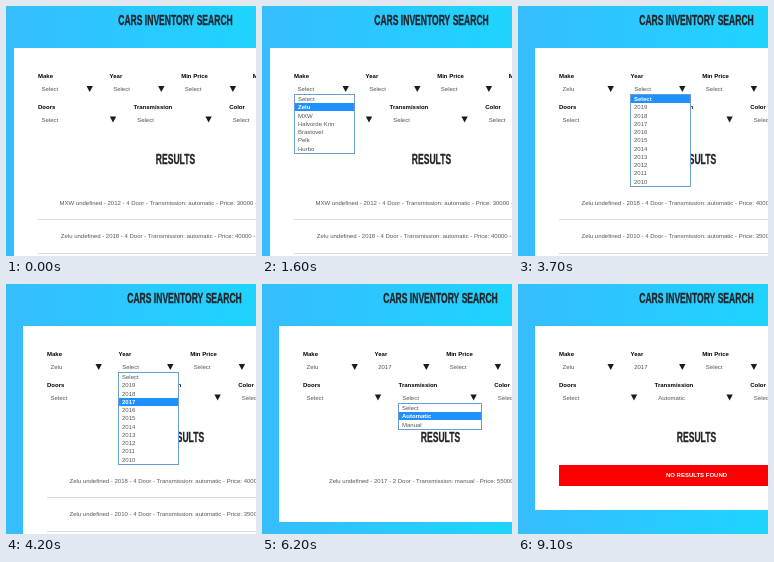
Recreate the animation shown at these times as an HTML page with a canvas. Size 250x250 px, loop 9.2 s.

```html
<!DOCTYPE html>
<html lang="en">
<head>
<meta charset="utf-8">
<title>Cars inventory search</title>
<style>
html, body { margin: 0; width: 100%; height: 100%; overflow: hidden; }
canvas { display: block; width: 100vw; height: 100vh; }
</style>
</head>
<body>
<canvas id="stage"></canvas>
<script>
const SIZE = 250, LOOP = 9200, ITEM = 8.25;
const SANS = '"Liberation Sans", Arial, sans-serif';
const INK = '#555', DARK = '#212529';
const canvas = document.getElementById('stage');
const ctx = canvas.getContext('2d');

const makes = ['Select', 'Zelu', 'MXW', 'Halvorde Krin', 'Brastovel', 'Pelk', 'Hurbo'];
const years = ['Select', ...Array.from({ length: 10 }, (_, i) => String(2019 - i))];
const gears = ['Select', 'Automatic', 'Manual'];

const car = (make, year, doors, gear, price) =>
  `${make} undefined - ${year} - ${doors} Door - Transmission: ${gear} - Price: ${price} -`;

const allCars = [[53.5, car('MXW', 2012, 4, 'automatic', 30000)],
                 [54.8, car('Zelu', 2018, 4, 'automatic', 40000)]];
const byMake = [[54.5, car('Zelu', 2018, 4, 'automatic', 40000)],
                [54.5, car('Zelu', 2010, 4, 'automatic', 35000)]];
const byYear = [[58, car('Zelu', 2017, 2, 'manual', 55000)]];

// Value of the last step that has begun
function stepAt(t, steps) {
  let value = steps[0][1];
  for (const [start, v] of steps) if (t >= start) value = v;
  return value;
}

function rect(x, y, w, h, fill) {
  ctx.fillStyle = fill;
  ctx.fillRect(x, y, w, h);
}

function text(str, x, y, fill = INK, weight = 400, align = 'left') {
  ctx.font = `${weight} 6px ${SANS}`;
  ctx.textAlign = align;
  ctx.fillStyle = fill;
  ctx.fillText(str, x, y);
}

// Narrow display face for both headings
function heading(str, x, y) {
  ctx.save();
  ctx.translate(x, y);
  ctx.scale(0.59, 1);
  ctx.font = `700 14.5px ${SANS}`;
  ctx.textAlign = 'center';
  ctx.fillStyle = ctx.strokeStyle = DARK;
  ctx.lineWidth = 0.4;
  ctx.fillText(str, 0, 0);
  ctx.strokeText(str, 0, 0);
  ctx.restore();
}

function field(label, value, x, y, width) {
  text(label, x, y, '#000', 700);
  text(value, x + 3.6, y + 12.7);
  const ax = x + width, ay = y + 7.8;
  ctx.fillStyle = '#1c1c1c';
  ctx.beginPath();
  ctx.moveTo(ax - 3.2, ay);
  ctx.lineTo(ax + 3.2, ay);
  ctx.lineTo(ax, ay + 6);
  ctx.fill();
}

function menu(items, active, x, y, w) {
  const h = Math.round(items.length * ITEM + 2);
  rect(x, y, w, h, '#6c9bd2');
  rect(x + 1, y + 1, w - 2, h - 2, '#fff');
  items.forEach((item, i) => {
    const top = y + 1 + i * ITEM, on = i === active;
    if (on) rect(x + 1, Math.round(top), w - 2, 8, '#1e90ff');
    text(item, x + 4, top + 6, on ? '#fff' : INK, on ? 700 : 400);
  });
}

function results(rows) {
  rows.forEach(([x, str], i) => {
    text(str, x, 199 + i * 33.2);
    if (rows.length > 1) rect(32, 213 + i * 34, 260, 1, '#dcdcdc');
  });
}

function draw(t) {
  const scale = canvas.width / SIZE;
  ctx.setTransform(scale, 0, 0, scale, 0, 0);
  const sky = ctx.createLinearGradient(0, 0, SIZE, 0);
  sky.addColorStop(0, '#36bdff');
  sky.addColorStop(1, '#1ed4ff');
  rect(0, 0, SIZE, SIZE, sky);

  ctx.translate(t < 1900 ? 0 : 9, 0);
  heading('CARS INVENTORY SEARCH', 169.5, 19);
  rect(8, 42, 300, stepAt(t, [[0, 220], [4600, 196], [6800, 184]]), '#fff');

  const make = t < 1900 ? 'Select' : makes[1];
  const year = t < 4600 ? 'Select' : '2017';
  const gear = t < 6800 ? 'Select' : 'Automatic';
  ['Make', 'Year', 'Min Price', 'Max Price'].forEach((label, i) =>
    field(label, [make, year][i] || 'Select', 32 + i * 71.6, 72.2, 51.7));
  ['Doors', 'Transmission', 'Color'].forEach((label, i) =>
    field(label, i === 1 ? gear : 'Select', 32 + i * 95.6, 102.8, 75));

  heading('RESULTS', 169.5, 158);
  if (t < 6800) {
    results(stepAt(t, [[0, allCars], [1900, byMake], [4600, byYear]]));
  } else {
    rect(32, 181, 260, 21, '#f00');
    text('NO RESULTS FOUND', 169.5, 193.2, '#fff', 700, 'center');
  }

  if (t >= 800 && t < 1900)
    menu(makes, stepAt(t, [[800, 0], [1200, 2], [1600, 1]]), 32, 88, 61);
  if (t >= 3700 && t < 4600)
    menu(years, stepAt(t, [[3700, 0], [4100, 2], [4200, 3]]), 103, 88, 61);
  if (t >= 5900 && t < 6800)
    menu(gears, stepAt(t, [[5900, 0], [6200, 1]]), 127, 119, 84);
}

function resize() {
  canvas.width = canvas.height = Math.round(SIZE * (window.devicePixelRatio || 1));
}

const begin = performance.now();
function tick(now) {
  draw(Math.max(0, now - begin) % LOOP);
  requestAnimationFrame(tick);
}
window.addEventListener('resize', resize);
resize();
draw(0);
requestAnimationFrame(tick);
</script>
</body>
</html>
```
